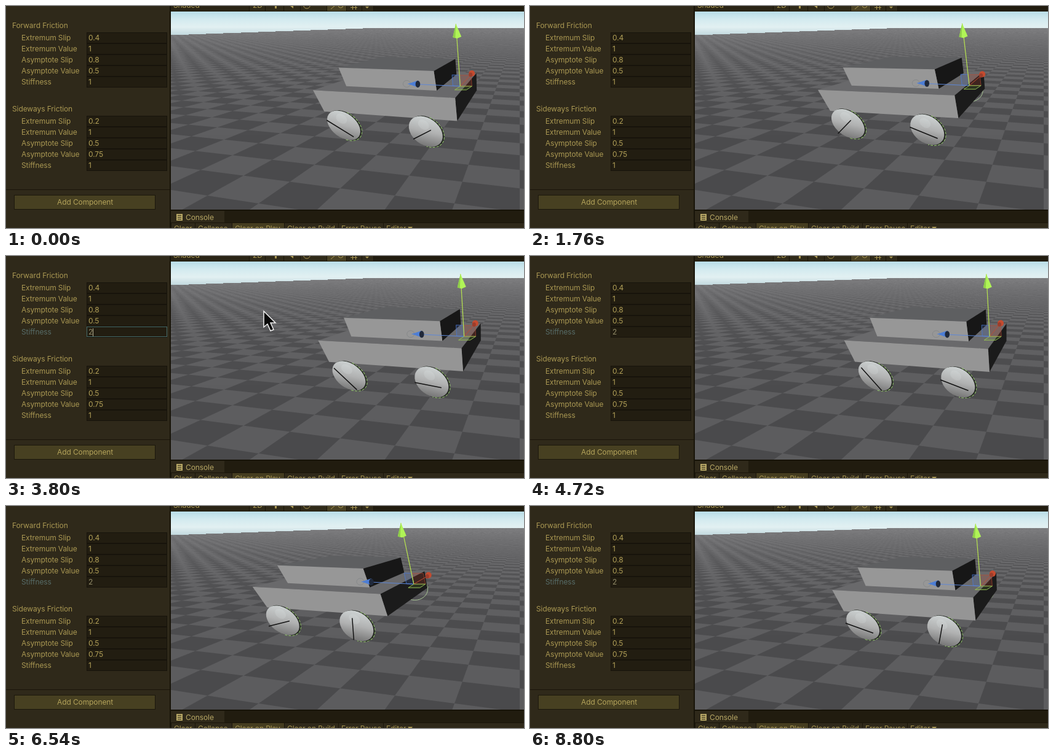
An HTML page with a canvas for the animation above (8870 ms loop, 842 by 362 pixels).

```html
<!DOCTYPE html>
<html>
<head>
<meta charset="utf-8">
<style>
html, body { margin: 0; width: 842px; height: 362px; overflow: hidden; background: #2f291a; }
canvas { display: block; }
</style>
</head>
<body>
<canvas id="stage" width="842" height="362"></canvas>
<script>
const ctx = document.getElementById('stage').getContext('2d');
const LOOP = 8870, STEP = LOOP / 126;
const PANEL = '#2f291a', TEXT = '#a99752', DARK = '#211c0f', EDGE = '#1a150a';

// Vanishing points: along the car, across it, and straight down
const ALONG = [-1500, 27], ACROSS = [835, 27], DOWN = [775, 660];
const ORIGIN = [730, 150];
const LENGTH = 0.1156, WIDTH = 0.49, HEIGHT = 0.0794;

// Projects a point given in body lengths, widths and heights
function project(a, b, c) {
  const k = [1, a * LENGTH, b * WIDTH, c * HEIGHT];
  const ends = [ORIGIN, ALONG, ACROSS, DOWN];
  const w = k.reduce((sum, v) => sum + v);
  return [0, 1].map(axis => k.reduce((sum, v, i) => sum + v * ends[i][axis], 0) / w);
}

// Turning points of the drive: time and position of the left body corner
const TURNS = [[0, 499], [960, 444], [4600, 513], [6510, 398], [9300, 497]];
function drive(t) {
  const i = TURNS.findIndex((turn, n) => n > 0 && t < turn[0]);
  const [t0, x0] = TURNS[i - 1], [t1, x1] = TURNS[i];
  const u = (t - t0) / (t1 - t0), reverse = x1 < x0;
  return {
    x: x0 + (x1 - x0) * (reverse ? u ** 1.4 : 1 - (1 - u) ** 1.65),
    tilt: reverse ? 0.125 * Math.sin(Math.PI * u) : -0.14 * (1 - u) ** 2
  };
}

const POINTER = [[2050, 460, 11], [2400, 123, 143], [2540, 123, 143], [2780, 34, 120],
  [3300, 115, 144], [3580, 115, 144], [3800, 419, 90], [4060, 445, -34]];
function pointerAt(t) {
  const i = POINTER.findIndex(key => t < key[0]);
  if (i < 1) return null;
  const p = POINTER[i - 1], q = POINTER[i], u = (t - p[0]) / (q[0] - p[0]);
  const ease = u * u * (3 - 2 * u);
  return [p[1] + (q[1] - p[1]) * ease, p[2] + (q[2] - p[2]) * ease];
}

function box(x, y, w, h, color) {
  ctx.fillStyle = color;
  ctx.fillRect(x, y, w, h);
}
function path(points) {
  ctx.beginPath();
  points.forEach(p => ctx.lineTo(p[0], p[1]));
}
function poly(points, fill, stroke, width = 1) {
  path(points);
  ctx.closePath();
  if (fill) { ctx.fillStyle = fill; ctx.fill(); }
  if (stroke) { ctx.strokeStyle = stroke; ctx.lineWidth = width; ctx.stroke(); }
}
function line(points, color, width = 1) {
  path(points);
  ctx.strokeStyle = color;
  ctx.lineWidth = width;
  ctx.stroke();
}
function oval(x, y, rx, ry, fill, stroke) {
  ctx.beginPath();
  ctx.ellipse(x, y, rx, ry, 0, 0, 7);
  if (fill) { ctx.fillStyle = fill; ctx.fill(); }
  if (stroke) { ctx.strokeStyle = stroke; ctx.lineWidth = 1; ctx.stroke(); }
}
function label(text, x, y, color = TEXT) {
  ctx.fillStyle = color;
  ctx.fillText(text, x, y);
}
function gradient(x0, y0, x1, y1, colors) {
  const g = ctx.createLinearGradient(x0, y0, x1, y1);
  colors.forEach((color, i) => g.addColorStop(i / (colors.length - 1), color));
  return g;
}

// Checkered ground, sharing the car's vanishing points
function makeGround() {
  const w = 574, h = 323, size = 0.36, layer = document.createElement('canvas');
  layer.width = w;
  layer.height = h;
  const g = layer.getContext('2d'), img = g.createImageData(w, h);
  for (let py = 0; py < h; py++) for (let px = 0; px < w; px++) {
    const x = px + 268, y = py + 9, depth = y - 27;
    if (y < 36 || y < 47 - px * 0.0353) continue;
    let sum = 0;
    for (let k = 0; k < 16; k++) {
      const sx = x + (k % 4) / 4, d = depth + (k >> 2) / 4;
      const cell = Math.floor((sx - ALONG[0]) / d / size / 3) + Math.floor((sx - ACROSS[0]) / d / size);
      sum += cell & 1 ? 1 : -1;
    }
    const amp = 9 * Math.min(1, 0.25 + depth / 80);
    const tone = 83 + 50 * Math.exp(-depth / 52) + amp * sum / 16;
    img.data.set([tone, tone, tone + 2, 255], (py * w + px) * 4);
  }
  g.putImageData(img, 0, 0);
  return layer;
}
const ground = makeGround();

function drawScene() {
  box(268, 9, 574, 323, gradient(0, 9, 0, 47, ['#b9dde7', '#d3eaef', '#e2f0f2', '#c2d9de']));
  ctx.drawImage(ground, 268, 9);
}

function drawWheel([x, y], b, spin) {
  const a = 31.5;
  ctx.save();
  ctx.translate(x, y);
  ctx.rotate(0.65);
  oval(1, -0.5, a, b, '#262a24');
  oval(-0.5, 0.5, a - 1, b - 0.5, gradient(-9, -20, 9, 20, ['#ccd1d1', '#b0b1b1', '#7a7a7a']));
  oval(-10, -6, 10, 7, 'rgba(235,240,240,.16)');
  ctx.setLineDash([4, 2]);
  ctx.beginPath();
  ctx.ellipse(1, -0.5, a, b, 0, -1.9, 1.1);
  ctx.strokeStyle = '#8fbf6a';
  ctx.lineWidth = 1;
  ctx.stroke();
  ctx.setLineDash([]);
  // spoke on the outer face
  const r = spin * Math.PI / 180, dx = 26 * Math.cos(r), dy = 15 * Math.sin(r);
  line([[-2 - dx, 8 - dy], [-2 + dx, 8 + dy]], '#111', 1.5);
  ctx.restore();
}

// Draws the top, right and front faces of a block
function drawBlock(at, [a0, a1], [b0, b1], [c0, c1], top, side, front) {
  poly([at(a1, b0, c0), at(a0, b0, c0), at(a0, b1, c0), at(a1, b1, c0)], top);
  poly([at(a0, b0, c0), at(a0, b1, c0), at(a0, b1, c1), at(a0, b0, c1)], side);
  poly([at(a1, b0, c0), at(a0, b0, c0), at(a0, b0, c1), at(a1, b0, c1)], front);
}

function drawCar({ x, tilt }) {
  const shift = (ORIGIN[0] - x) / (x - ALONG[0]) / LENGTH - 1;
  const level = (a, b, c) => project(a + shift, b, c);
  const tilted = (a, b, c) => level(a, b, c + tilt * (0.6 - a));

  const rear = level(0.186, 1.13, 1.3);
  oval(rear[0], rear[1], 21, 18, null, '#a9c795');
  drawBlock(tilted, [0, 1], [0, 1], [0, 1], '#69696b', '#1b1b1b', '#959595');
  drawBlock(tilted, [0.165, 0.85], [0.18, 0.89], [-0.806, 0], '#5e5f61', '#171717', '#979797');
  drawWheel(level(0.785, -0.13, 1.33), 20, 2.4 * (x - 503));
  drawWheel(level(0.186, -0.13, 1.3), 22, 4.1 * (x - 444) + 60);
  drawGizmo(level(0.186, 1.13, 0.965));
}

function drawGizmo([ox, oy]) {
  // screen-space step from the origin towards a vanishing point
  const toward = (end, length) => {
    const dx = end[0] - ox, dy = end[1] - oy, k = length / Math.hypot(dx, dy);
    return [dx * k, dy * k];
  };
  const from = ([x, y]) => [ox + x, oy + y];
  const plane = (p, q, fill, stroke) =>
    poly([[0, 0], p, [p[0] + q[0], p[1] + q[1]], q].map(from), fill, stroke);
  const up = toward(DOWN, -18), flat = [19, 0];
  const tip = from(toward(DOWN, -102)), red = from(toward(ACROSS, 27)), blue = from(toward(ALONG, 85));

  plane(up, flat, 'rgba(190,70,45,.22)', 'rgba(190,75,50,.6)');
  plane(up, toward(ALONG, 12), 'rgba(70,110,200,.2)', 'rgba(75,120,210,.8)');
  plane(flat, [-9, 6], 'rgba(140,200,70,.15)', '#94bb55');
  line([[ox, oy], red], '#bb4d35');
  line([[ox, oy], blue], '#5d87d8');
  line([[ox, oy], tip], '#b8e44f', 1.2);

  const [bx, by] = blue, [tx, ty] = tip;
  oval(bx - 2, by, 6, 5.5, null, 'rgba(110,115,120,.4)');
  poly([blue, [bx + 16, by - 5.5], [bx + 16, by + 5.5]], '#4d7ed6');
  oval(bx + 16, by + 0.5, 3.8, 5.6, '#20293b');
  oval(red[0] + 0.5, red[1] - 1, 5, 5, '#c54b2f');
  oval(red[0] - 1.5, red[1] + 1, 3, 3.5, '#9c3d2b');
  poly([tip, [tx + 9, ty + 21], [tx + 2, ty + 24], [tx - 5, ty + 22]], '#b0f457');
  poly([tip, [tx - 5, ty + 22], [tx - 1, ty + 23.5]], '#8fce49');
}

function drawField(name, value, y, marked, focused) {
  label(name, 25, y + 4, marked ? '#576c68' : TEXT);
  box(131, y - 9, 131, 18, '#17130b');
  box(132, y - 8, 129, 16, '#221d11');
  if (focused) {
    ctx.strokeStyle = '#466a68';
    ctx.lineWidth = 1;
    ctx.strokeRect(131.5, y - 8.5, 130, 16);
    box(141, y - 6, 1, 13, '#b5b092');
  }
  label(value, 134, y + 4, marked ? '#928b68' : '#b3a158');
}

function drawInspector(t) {
  const marked = t > 2840, focused = marked && t < 4050;
  box(0, 0, 266, 362, PANEL);
  box(266, 0, 2, 362, '#181409');
  const names = ['Extremum Slip', 'Extremum Value', 'Asymptote Slip', 'Asymptote Value', 'Stiffness'];
  const groups = [
    ['Forward Friction', ['0.4', '1', '0.8', '0.5', t > 3300 ? '2' : '1']],
    ['Sideways Friction', ['0.2', '1', '0.5', '0.75', '1']]
  ];
  groups.forEach(([title, values], g) => {
    const top = 32 + 136 * g;
    label(title, 10, top + 4);
    names.forEach((name, i) => {
      const active = g === 0 && i === 4;
      drawField(name, values[i], top + 20 + 18 * i, active && marked, active && focused);
    });
  });
  box(0, 299, 266, 1, EDGE);
  box(13, 308, 230, 24, '#1c180c');
  box(14, 309, 228, 22, '#474021');
  label('Add Component', 83, 324, '#b3a25a');
}

function drawToolbar() {
  box(268, 0, 574, 9, DARK);
  box(268, 0, 127, 8, '#2a2415');
  box(395, 0, 202, 8, '#302a19');
  box(522, 0, 31, 8, '#4a4225');
  [395, 421, 451, 478, 521, 553, 578, 597].forEach(x => box(x, 0, 1, 8, EDGE));
  label('Shaded', 272, 3);
  label('2D', 401, 3);
  box(437, 0, 3, 4, TEXT);
  poly([[462, 0], [467, 0], [467, 4]], TEXT);
  oval(489, 0, 5, 4, null, TEXT);
  oval(544, 0, 3.5, 3, null, TEXT);
  line([[528, 5], [534, 0]], TEXT);
  [563, 568].forEach(x => box(x, 0, 1, 6, TEXT));
  box(560, 2, 11, 1, TEXT);
  poly([[584, 1], [590, 1], [587, 4]], TEXT);
}

function drawConsole() {
  box(268, 332, 574, 30, DARK);
  box(268, 332, 574, 2, '#171308');
  box(268, 334, 87, 19, PANEL);
  box(277, 339, 10, 11, '#b8a866');
  [341, 344, 347].forEach(y => box(279, y, 6, 1, PANEL));
  label('Console', 292, 349, '#b8a866');
  box(268, 353, 574, 9, PANEL);
  box(268, 353, 574, 1, EDGE);
  box(368, 354, 84, 8, '#453d20');
  const tabs = [['Clear', 273], ['Collapse', 312], ['Clear on Play', 372], ['Clear on Build', 457],
    ['Error Pause', 545], ['Editor', 618]];
  tabs.forEach(([text, x]) => {
    label(text, x, 367);
    box(x - 5, 354, 1, 8, EDGE);
  });
  poly([[653, 360], [661, 360], [657, 365]], TEXT);
}

function drawPointer(t) {
  const at = pointerAt(t);
  if (!at) return;
  const arrow = [[0, 0], [0, 26], [6, 21], [11, 32], [16, 30], [11, 19], [19, 19]];
  poly(arrow.map(p => [at[0] + p[0], at[1] + p[1]]), '#080808', '#f2f2f2', 1.5);
}

function draw(now) {
  const t = Math.floor((now % LOOP + 5) / STEP) * STEP % LOOP;
  ctx.font = '12px Inter, Roboto, sans-serif';
  ctx.letterSpacing = '-0.1px';
  drawScene();
  drawCar(drive(t));
  drawInspector(t);
  drawToolbar();
  drawConsole();
  drawPointer(t);
}

const start = performance.now();
function tick() {
  draw(performance.now() - start);
  requestAnimationFrame(tick);
}
tick();
</script>
</body>
</html>
```
